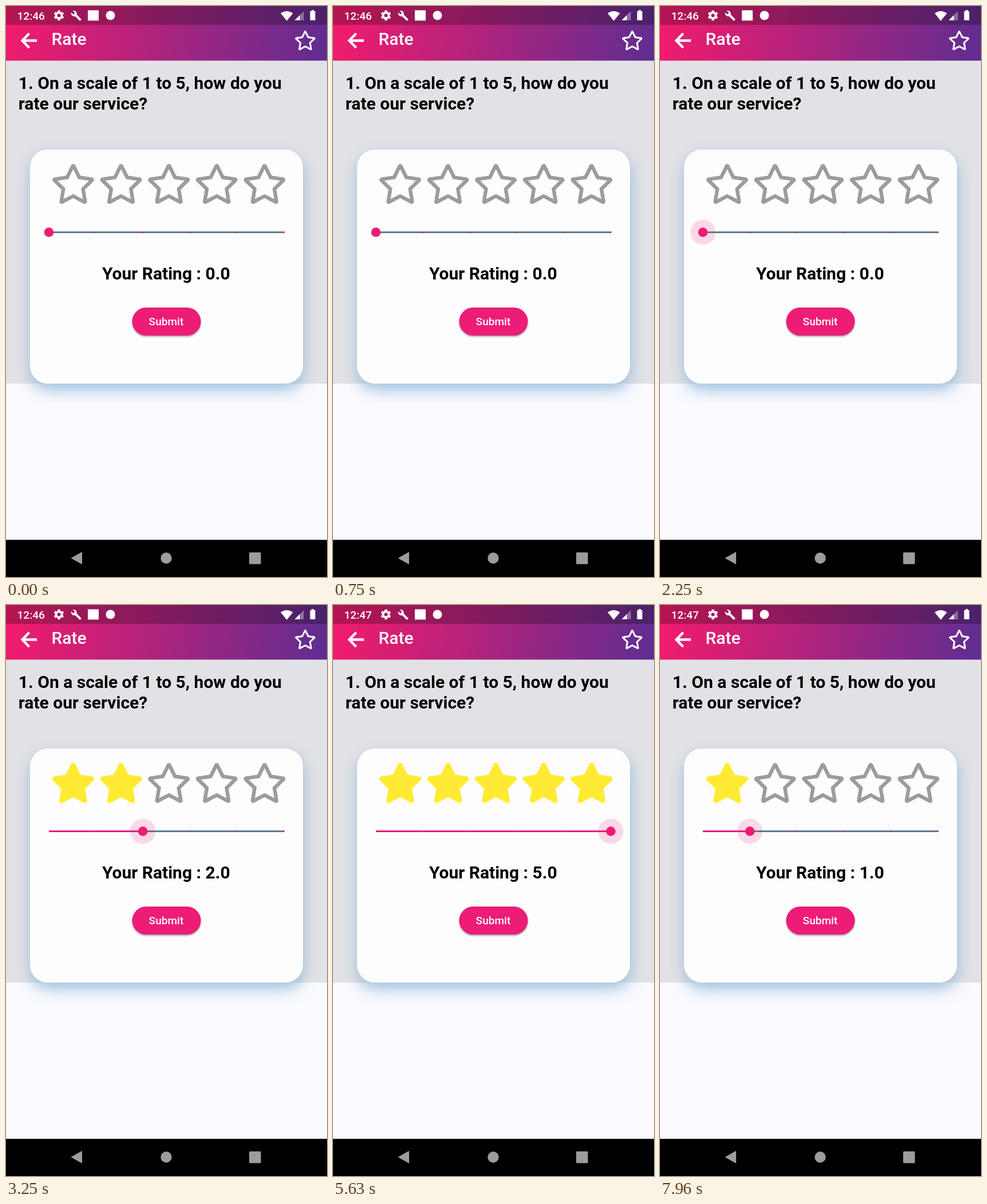
Recreate the animation shown at these times as an HTML page. Size 561 px wide and 998 px high, loop 8000 ms.

```html
<!DOCTYPE html>
<html lang="en">
<head>
<meta charset="utf-8">
<title>Rate</title>
<style>
  html, body { margin: 0; width: 100%; height: 100%; overflow: hidden; background: #fafaff; }
  svg { display: block; width: 100%; height: 100%; font-family: Roboto, sans-serif; }
  .bold { font-size: 30px; font-weight: 700; }
  .medium { font-weight: 500; fill: #fff; }
  .card { fill: #fdfdfd; filter: drop-shadow(1px 11px 13px rgba(138, 178, 212, .8)); }
  .button { fill: #ed1c76; filter: drop-shadow(0 2px 1.5px rgba(0, 0, 0, .35)); }
</style>
</head>
<body>
<svg viewBox="0 0 561 998">
  <defs>
    <linearGradient id="bar" gradientUnits="userSpaceOnUse" x1="0" y1="0" x2="561" y2="95">
      <stop stop-color="#f41b6c"/>
      <stop offset="1" stop-color="#5f2d91"/>
    </linearGradient>
    <path id="full" d="M259.3 17.8L194 150.2 47.9 171.5c-26.2 3.8-36.7 36.1-17.7 54.6l105.7 103-25 145.5c-4.5 26.3 23.2 46 46.4 33.7L288 439.6l130.7 68.7c23.2 12.2 50.9-7.4 46.4-33.7l-25-145.5 105.7-103c19-18.5 8.5-50.8-17.7-54.6L382 150.2 316.7 17.8c-11.7-23.6-45.6-23.9-57.4 0z"/>
    <path id="hole" d="M388.6 312.3l23.7 138.4L288 385.4l-124.3 65.3 23.7-138.4-100.6-98 139-20.2 62.2-126 62.2 126 139 20.2z"/>
    <mask id="ring">
      <use href="#full" fill="#fff"/>
      <use href="#hole" fill="#000"/>
    </mask>
    <g id="outline"><use href="#full" mask="url(#ring)"/></g>
  </defs>

  <rect width="561" height="998" fill="#fafaff"/>
  <rect y="95" width="561" height="565" fill="#e2e2e6"/>
  <rect width="561" height="95.5" fill="url(#bar)"/>
  <rect width="561" height="33" fill-opacity=".25"/>

  <!-- status bar -->
  <text id="clock" class="medium" x="19.5" y="23.5" font-size="19.1"></text>
  <g fill="#fff">
    <circle cx="92.5" cy="16.5" r="4.9" fill="none" stroke="#fff" stroke-width="3.8"/>
    <g id="teeth"></g>
    <path d="M131 22.5l-7.4-7.4a5.6 5.6 0 0 0-7-6.9l3.8 3.8-2.7 2.7-3.8-3.8a5.6 5.6 0 0 0 6.9 7l7.4 7.4q1 .9 1.9 0l.9-.9q1-1 0-1.9z"/>
    <rect x="143" y="7.500" width="19" height="18"/>
    <circle cx="182.500" cy="16.500" r="8"/>
    <path d="M480 12.800Q490.500 5.200 501.500 12.800L490.700 26z"/>
    <path d="M520.500 9v16h-16z" fill-opacity=".35"/>
    <path d="M513.500 16v9h-9z"/>
    <path d="M531.500 9h2.500V7h4v2h2.500v16h-9z"/>
  </g>

  <!-- title bar -->
  <path d="M40.500 48L28.500 60.500l12 12.500M29 60.500H54" fill="none" stroke="#fff" stroke-width="4.300"/>
  <text class="medium" x="79.500" y="68" font-size="30">Rate</text>
  <use href="#outline" fill="#fff" transform="translate(503.600 43) scale(.0672)"/>

  <text class="bold" x="21.800" y="144.500">1. On a scale of 1 to 5, how do you</text>
  <text class="bold" x="21.800" y="180.500">rate our service?</text>

  <rect class="card" x="42" y="251" width="477" height="409" rx="31"/>
  <g id="stars"></g>

  <!-- slider -->
  <path d="M75 395.500H486.500" stroke="#607d8b" stroke-width="2.800"/>
  <path id="active" stroke="#e91e78" stroke-width="2.800"/>
  <g id="ticks"></g>
  <g id="thumb" fill="#ed1c72">
    <circle id="halo" r="22" fill="#e91e78" fill-opacity=".16"/>
    <circle r="8.300"/>
  </g>

  <text id="rating" class="bold" x="279.800" y="478" text-anchor="middle"></text>
  <rect class="button" x="220.500" y="527" width="120" height="49" rx="24.500"/>
  <text class="medium" x="280" y="558.300" font-size="19.100" text-anchor="middle">Submit</text>

  <!-- navigation bar -->
  <rect y="933" width="561" height="65"/>
  <g fill="#9c9c9c">
    <path d="M113.500 965L133 954v22z"/>
    <circle cx="280" cy="965" r="9.700"/>
    <rect x="425" y="955" width="20.500" height="20.500" rx="1.500"/>
  </g>
</svg>

<script>
  const LOOP = 8000, TOUCH = 2100, MINUTE = 3900, SLIDE = 75;
  // [time in ms, rating]
  const steps = [[0, 0], [2400, 1], [2900, 2], [3700, 3], [4200, 4],
                 [4900, 5], [6400, 4], [6800, 3], [7200, 2], [7600, 1]];

  const el = id => document.getElementById(id);
  const make = (parent, tag, attrs) => {
    const node = document.createElementNS('http://www.w3.org/2000/svg', tag);
    for (const key in attrs) node.setAttribute(key, attrs[key]);
    return parent.appendChild(node);
  };
  const sliderX = value => 75 + 82.1 * value;
  const clamp = n => Math.max(0, Math.min(1, n));
  const ease = n => n * n * (3 - 2 * n);

  for (let i = 0; i < 6; i++)
    make(el('teeth'), 'rect', { x: 90.3, y: 7.7, width: 4.4, height: 4, transform: `rotate(${i * 60} 92.5 16.5)` });

  const stars = [0, 1, 2, 3, 4].map(i =>
    make(el('stars'), 'use', { transform: `translate(${78.1 + 83.6 * i} 276) scale(.1367)` }));
  const ticks = [1, 2, 3, 4, 5].map(i =>
    make(el('ticks'), 'circle', { cx: Math.min(sliderX(i), 485.2), cy: 395.5, r: 1.4 }));

  function draw(time) {
    let at = steps.length - 1;
    while (steps[at][0] > time) at--;
    const [start, rating] = steps[at];
    const before = at ? steps[at - 1][1] : 0;
    const value = before + (rating - before) * ease(clamp((time - start) / SLIDE));
    const x = sliderX(value);

    el('clock').textContent = time < MINUTE ? '12:46' : '12:47';
    el('rating').textContent = `Your Rating : ${rating}.0`;
    el('active').setAttribute('d', `M75 395.5H${x}`);
    el('thumb').setAttribute('transform', `translate(${x} 395.5)`);
    el('halo').setAttribute('r', 22 * ease(clamp((time - TOUCH) / 100)));
    stars.forEach((star, i) => {
      star.setAttribute('href', i < rating ? '#full' : '#outline');
      star.setAttribute('fill', i < rating ? '#ffeb34' : '#9c9c9c');
    });
    ticks.forEach((tick, i) => tick.setAttribute('fill', i + 1 <= value ? '#a5507f' : '#e91e78'));
  }

  const origin = performance.now();
  function frame() {
    draw((performance.now() - origin) % LOOP);
    requestAnimationFrame(frame);
  }
  frame();
</script>
</body>
</html>
```
